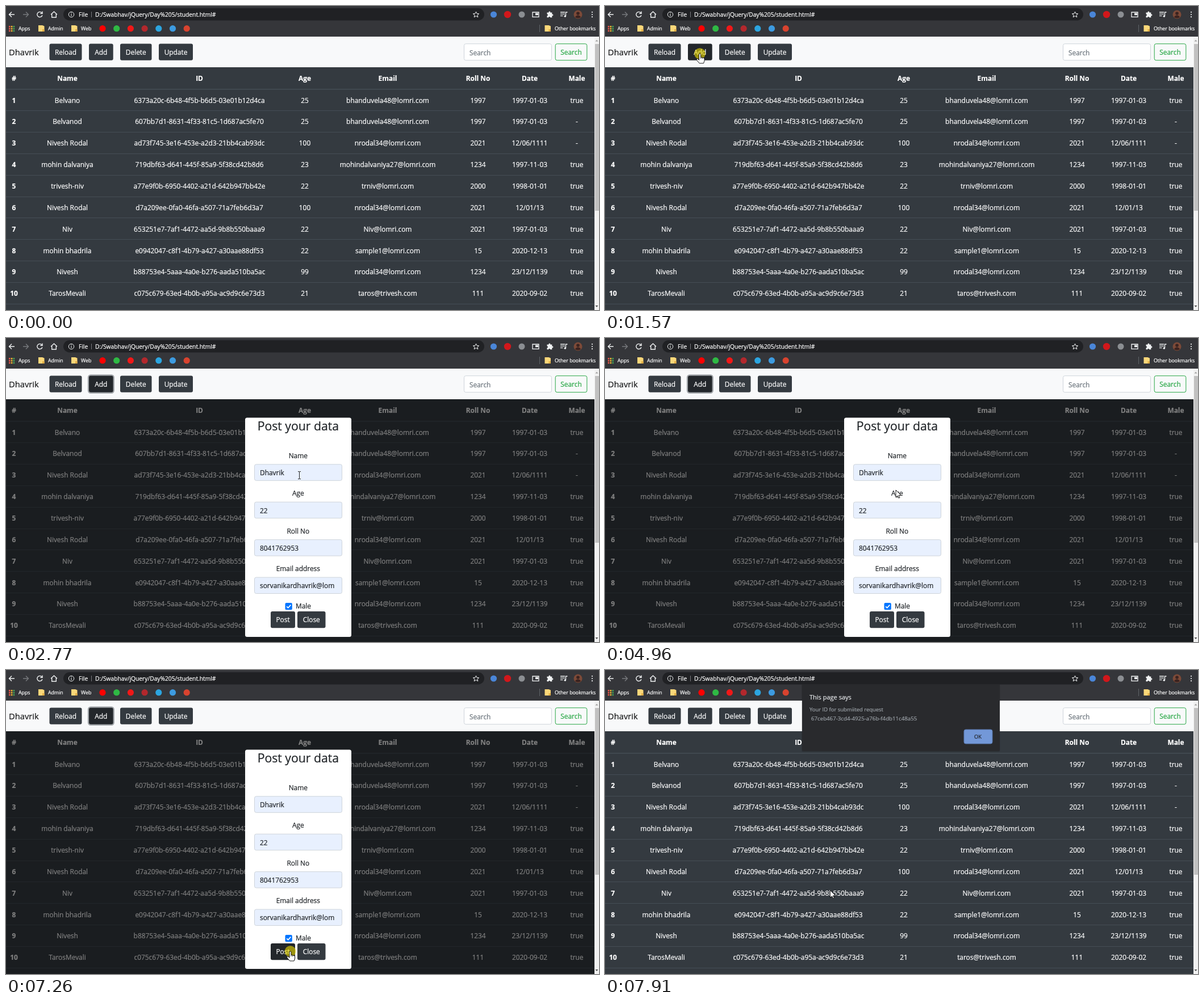
These frames come from a looping animation (1044 by 536 pixels, 8000 ms). An HTML page:

```html
<!DOCTYPE html>
<html lang="en">
<head>
<meta charset="utf-8">
<title>Student table</title>
<style>
html, body { margin: 0; width: 100%; height: 100%; overflow: hidden; background: #343a40; }
svg { display: block; width: 100%; height: 100%; font-family: "Open Sans", "Noto Sans", sans-serif; }
text { stroke-width: .22px; }
</style>
</head>
<body>
<svg id="stage" viewBox="0 0 1044 536"></svg>
<script>
const LOOP = 8000;
const INK = '#212529', WHITE = '#fff', DARK = '#343a40';

const rect = (x, y, w, h, fill, more = '') =>
  `<rect x="${x}" y="${y}" width="${w}" height="${h}" fill="${fill}" ${more}/>`;
const dot = (x, y, r, fill) => `<circle cx="${x}" cy="${y}" r="${r}" fill="${fill}"/>`;
const path = (d, stroke, width = 1.4, fill = 'none') =>
  `<path d="${d}" stroke="${stroke}" stroke-width="${width}" fill="${fill}"/>`;
const shape = (d, fill) => path(d, 'none', 0, fill);
const text = (x, y, s, { size = 11.9, fill = WHITE, anchor = 'start', weight = 400 } = {}) =>
  `<text x="${x}" y="${y}" font-size="${size}" fill="${fill}" stroke="${fill}" text-anchor="${anchor}" font-weight="${weight}">${s}</text>`;
const group = (id, body) => `<g id="${id}">${body}</g>`;

// Buttons: x, y, width, label
const buttons = {
  reload: [76.5, 66.5, 57, 'Reload'],
  add: [146, 66.5, 42.7, 'Add'],
  delete: [201, 66.5, 55.5, 'Delete'],
  update: [269, 66.5, 60, 'Update'],
  post: [466, 482, 43, 'Post'],
  close: [513, 482, 49.5, 'Close']
};
const BUTTON_H = 29.3;
function button(id) {
  const [x, y, w, label] = buttons[id];
  return rect(x, y, w, BUTTON_H, DARK, `rx="3" id="${id}"`) +
    text(x + w / 2, y + 19.3, label, { anchor: 'middle' });
}

function folder(x) {
  return shape(`M${x} 34h7l3.5 1.5V45H${x}Z`, '#fbd779') + shape(`M${x + 7} 41h3.5v4h-3.5Z`, '#e3ae45');
}

function browser() {
  const grey = '#77797d', pale = '#f1f3f4';
  let s = rect(0, 0, 1044, 54, '#35363a') + rect(101, 4, 741, 21.5, '#202124', 'rx="10.7"');
  s += path('M15 15H5.5M10 10.5L5.5 15l4.5 4.5', pale);
  s += path('M30 15h9.5M35 10.5l4.5 4.5-4.5 4.5', grey);
  s += path('M63 12a4.6 4.6 0 1 0 .9 4.2M64 9.5v3.7h-3.7', pale);
  s += path('M79 15l5.5-5 5.5 5M80.7 14v6h7.6v-6', pale);
  s += path('M115 14.3v3.2M115 11.8v1.2', pale, 1.2) + `<circle cx="115" cy="15" r="4.7" fill="none" stroke="${pale}"/>`;
  s += text(128, 18.5, 'File', { size: 10.2 }) + rect(150, 10, 1, 10, grey);
  s += text(157, 18.5, 'D:/Swabhav/jQuery/Day%205/student.html#', { size: 10.25 });
  s += path('M827.5 10l1.5 3.4 3.7.3-2.8 2.4.9 3.6-3.3-2-3.3 2 .9-3.6-2.8-2.4 3.7-.3Z', pale, 1);
  s += dot(858.5, 15, 5.6, '#4a86d8') + dot(883, 15, 6.2, '#d1171b') + dot(908, 15, 5.5, '#8b8e92');
  s += path('M927 11h11v8.4h-11Z', pale, 1.3) + rect(932, 12.5, 5, 3.6, pale);
  s += shape('M952.5 11.5h3v-.7a1.4 1.4 0 0 1 2.8 0v.7h3v3h.7a1.4 1.4 0 0 1 0 2.8h-.7v3h-3.1a1.5 1.5 0 0 0-3 0h-2.7v-3a1.5 1.5 0 0 0 0-3Z', pale);
  s += path('M976 11h8M976 14.2h8M976 17.4h4.5M985.5 18v-7h3', pale, 1.3) + dot(984.3, 18, 1.8, pale);
  s += dot(1007, 15, 7.5, '#7c4a38') + dot(1007, 13, 2.8, '#3a2320') + shape('M1001.8 19.5q5.2-6.5 10.4 0a7.5 7.5 0 0 1-10.4 0Z', '#3a2320');
  s += [10.8, 15, 19.2].map(y => dot(1032, y, 1.1, pale)).join('');

  const hues = ['#e8564a', '#f2b632', '#45a35a', '#4f8ee8'];
  for (let i = 0; i < 9; i++) {
    const col = i % 3, row = Math.floor(i / 3);
    s += rect(5 + col * 3.8, 35 + row * 3.8, 2.6, 2.6, hues[(i + row) % 4]);
  }
  const mark = { size: 8.8 };
  s += text(22, 42.8, 'Apps', mark) + folder(57) + text(74, 42.8, 'Admin', mark);
  s += folder(115) + text(132, 42.8, 'Web', mark);
  ['#f00', '#2fb944', '#f01818', '#b3282d', '#2ca5e0', '#3d9be0', '#d8432f']
    .forEach((c, i) => s += dot(170 + i * 24.7, 39.7, 5.6, c));
  return s + rect(939, 33, 1, 13, '#5f6368') + folder(948.5) + text(966, 42.8, 'Other bookmarks', mark);
}

function navbar() {
  return rect(0, 54, 1036, 54, '#f8f9fa') + text(5, 87, 'Dhavrik', { size: 14.7, fill: '#18191a' }) +
    rect(145, 65.5, 44.7, 31.3, 'none', 'id="ring" rx="4" stroke="#a4a8ac" stroke-width="2.4"') +
    ['reload', 'add', 'delete', 'update'].map(button).join('') +
    rect(806.5, 66.7, 154, 29, WHITE, 'rx="3" stroke="#ced4da"') +
    text(816, 86.5, 'Search', { fill: '#6c757d' }) +
    rect(967.2, 66.7, 55.6, 29, 'none', 'rx="3" stroke="#28a745"') +
    text(995, 85.8, 'Search', { fill: '#28a745', anchor: 'middle' });
}

const columns = [14, 108, 340.5, 526, 672, 831, 922, 1005];
const heads = '#|Name|ID|Age|Email|Roll No|Date|Male';
const rows = [
  'Belvano|6373a20c-6b48-4f5b-b6d5-03e01b12d4ca|25|bhanduvela48@lomri.com|1997|1997-01-03|true',
  'Belvanod|607bb7d1-8631-4f33-81c5-1d687ac5fe70|25|bhanduvela48@lomri.com|1997|1997-01-03|-',
  'Nivesh Rodal|ad73f745-3e16-453e-a2d3-21bb4cab93dc|100|nrodal34@lomri.com|2021|12/06/1111|-',
  'mohin dalvaniya|719dbf63-d641-445f-85a9-5f38cd42b8d6|23|mohindalvaniya27@lomri.com|1234|1997-11-03|true',
  'trivesh-niv|a77e9f0b-6950-4402-a21d-642b947bb42e|22|trniv@lomri.com|2000|1998-01-01|true',
  'Nivesh Rodal|d7a209ee-0fa0-46fa-a507-71a7feb6d3a7|100|nrodal34@lomri.com|2021|12/01/13|true',
  'Niv|653251e7-7af1-4472-aa5d-9b8b550baaa9|22|Niv@lomri.com|2021|1997-01-03|true',
  'mohin bhadrila|e0942047-c8f1-4b79-a427-a30aae88df53|22|sample1@lomri.com|15|2020-12-13|true',
  'Nivesh|b88753e4-5aaa-4a0e-b276-aada510ba5ac|99|nrodal34@lomri.com|1234|23/12/1139|true',
  'TarosMevali|c075c679-63ed-4b0b-a95a-ac9d9c6e73d3|21|taros@trivesh.com|111|2020-09-02|true'
];
function table() {
  const line = (cells, y, bold) => cells.split('|').map((c, i) =>
    text(columns[i], y, c, { anchor: 'middle', weight: bold || !i ? 700 : 400 })).join('');
  let s = rect(0, 108, 1036, 428, DARK) + rect(0, 146, 1036, 1.5, '#454d55') + line(heads, 132, true);
  rows.forEach((r, i) => {
    const y = 170.6 + i * 37.85;
    s += line(`${i + 1}|${r}`, y) + rect(0, Math.round(y + 13.6), 1036, 1, '#454d55');
  });
  return s;
}

function scrollbar() {
  return rect(1036, 54, 8, 482, '#f1f1f1') + rect(1037, 67, 7, 294, '#c1c1c1') +
    shape('M1037.5 62.5l2.500-3 2.500 3Z'.replaceAll('.500', '.5'), '#a3a3a3') +
    shape('M1037.5 528l2.5 3 2.5-3Z', '#505050');
}

const INPUT = { x: 437, w: 155, h: 29.5 };
const fields = [['Name', 'Dhavrik'], ['Age', '22'], ['Roll No', '8041762953'], ['Email address', 'sorvanikardhavrik@lom']];
const fieldY = i => 222.3 + i * 66.4;
function modal() {
  let s = rect(0, 108, 1036, 428, '#000', 'opacity=".5"');
  s += rect(421, 140.5, 187, 386.5, WHITE, 'rx="3.5"');
  s += text(514.3, 163, 'Post your data', { size: 21.2, fill: INK, anchor: 'middle', weight: 500 });
  fields.forEach(([label, value], i) => {
    const y = fieldY(i);
    s += text(514.3, y - 10.3, label, { fill: INK, anchor: 'middle' });
    s += rect(INPUT.x + .5, y + .5, INPUT.w - 1, INPUT.h - 1, '#e8f0fe', 'rx="3" stroke="#ced4da"');
    s += text(447, y + 19.9, value, { fill: INK });
  });
  s += rect(491.5, 467, 12.3, 12.3, '#0075ff', 'rx="2"') + path('M494.2 473.3l2.5 2.5 4.6-5.2', WHITE, 1.7);
  return s + text(510, 477.4, 'Male', { fill: INK }) + button('post') + button('close');
}

function alertBox() {
  const grey = '#9aa0a6';
  return rect(346, 25, 349.5, 119.5, '#000', 'rx="3" opacity=".12"') + rect(347, 25, 348, 118, '#292a2d', 'rx="2"') +
    text(360, 52, 'This page says', { size: 11, fill: '#e8eaed' }) +
    text(360, 73.3, 'Your ID for submiited request', { size: 9.45, fill: grey }) +
    text(363, 88.5, '67ceb467-3cd4-4925-a76b-f4db11c48a55', { size: 9.7, fill: grey }) +
    rect(632, 105, 50, 25, '#7398d8', 'rx="3" stroke="#5876ab"') +
    text(656.5, 121, 'OK', { size: 9.3, fill: '#202124', anchor: 'middle' });
}

const cursors = {
  arrow: path('M0 0V13l3.1-2.8L5 14.3l2-.9-1.9-4H9.4Z', '#000', .9, WHITE),
  hand: path('M-1.5 1.5a1.5 1.5 0 0 1 3 0V6.3l5 1.2q1.6.5 1.6 2.2v2.6L6.6 17H-.8L-5.6 11.2q-.8-1.6.6-2.2 1-.3 2 .8l1.5 1.5Z', '#000', .9, WHITE) +
    path('M1.5 6.3v3M4.2 7v2.5', '#000', .7),
  beam: path('M-2.5-6.5h2l.5.5.5-.5h2M0-6V6M-2.5 6.5h2L0 6l.5.5h2', '#222', 1)
};

stage.innerHTML = browser() + navbar() + table() + group('modal', modal()) + scrollbar() +
  group('status', rect(0, 521, 193, 15, '#35363a') +
    text(188, 532, 'file:///D:/Swabhav/jQuery/Day 5/student.html#', { size: 8.7, fill: '#a9adb2', anchor: 'end' })) +
  group('alert', alertBox()) +
  group('pointer', '<circle id="click" r="9.8" fill="#e6d700" opacity=".62"/>' +
    Object.entries(cursors).map(([id, art]) => group(id, art)).join(''));

// Pointer moves: start, end, number of steps, points along the way
const moves = [
  [160, 500, 4, [602, 483], [195.5, 317]],
  [640, 1360, 8, [190, 285], [108, 88], [167, 84]],
  [1790, 2220, 5, [200, 110], [400, 262]],
  [2340, 2770, 5, [440, 250], [516.5, 242]],
  [4960, 5730, 8, [512, 268], [503, 482]],
  [5830, 5940, 2, [502, 490], [500.5, 496]],
  [7780, 7910, 2, [440, 430], [396.5, 388.5]]
];
function pointerAt(t) {
  const move = moves.filter(m => t >= m[0]).pop();
  if (!move) return null;
  const [start, end, steps, ...pts] = move;
  const step = Math.min(steps - 1, Math.floor((t - start) / (end - start) * (steps - 1) + 1e-6));
  const u = step / (steps - 1) * (pts.length - 1);
  const i = Math.min(pts.length - 2, Math.floor(u));
  return [0, 1].map(k => pts[i][k] + (pts[i + 1][k] - pts[i][k]) * (u - i));
}

const el = id => document.getElementById(id);
const show = (id, on) => el(id).style.display = on ? '' : 'none';
const within = (t, a, b) => t >= a && t < b;
const inside = ([px, py], x, y, w, h) => within(px, x, x + w) && within(py, y, y + h);

function draw(t) {
  const open = within(t, 1690, 7350), focus = within(t, 1790, 7350);
  const pos = pointerAt(t);
  show('modal', open);
  show('ring', focus);
  show('status', within(t, 1690, 2450));

  // The alert starts as a faint trace a little above its place
  const faint = t < 7470;
  show('alert', t >= 7350);
  el('alert').setAttribute('opacity', faint ? .02 : 1);
  el('alert').setAttribute('transform', `translate(0 ${faint ? -13 : 0})`);
  show('pointer', pos);

  let kind = 'arrow';
  for (const [id, [x, y, w]] of Object.entries(buttons)) {
    const active = open || y < 108;
    const over = pos && active && inside(pos, x, y, w, BUTTON_H);
    if (over) kind = 'hand';
    el(id).setAttribute('fill', over || (focus && id === 'add') ? '#23272b' : DARK);
  }
  if (!pos) return;
  if (open && fields.some((f, i) => inside(pos, INPUT.x, fieldY(i), INPUT.w, INPUT.h))) kind = 'beam';
  for (const id in cursors) show(id, id === kind);
  show('click', within(t, 1470, 1690) || within(t, 7260, 7350));
  el('pointer').setAttribute('transform', `translate(${pos})`);
}

const begin = performance.now();
function tick() {
  draw((performance.now() - begin) % LOOP);
  requestAnimationFrame(tick);
}
tick();
</script>
</body>
</html>
```
